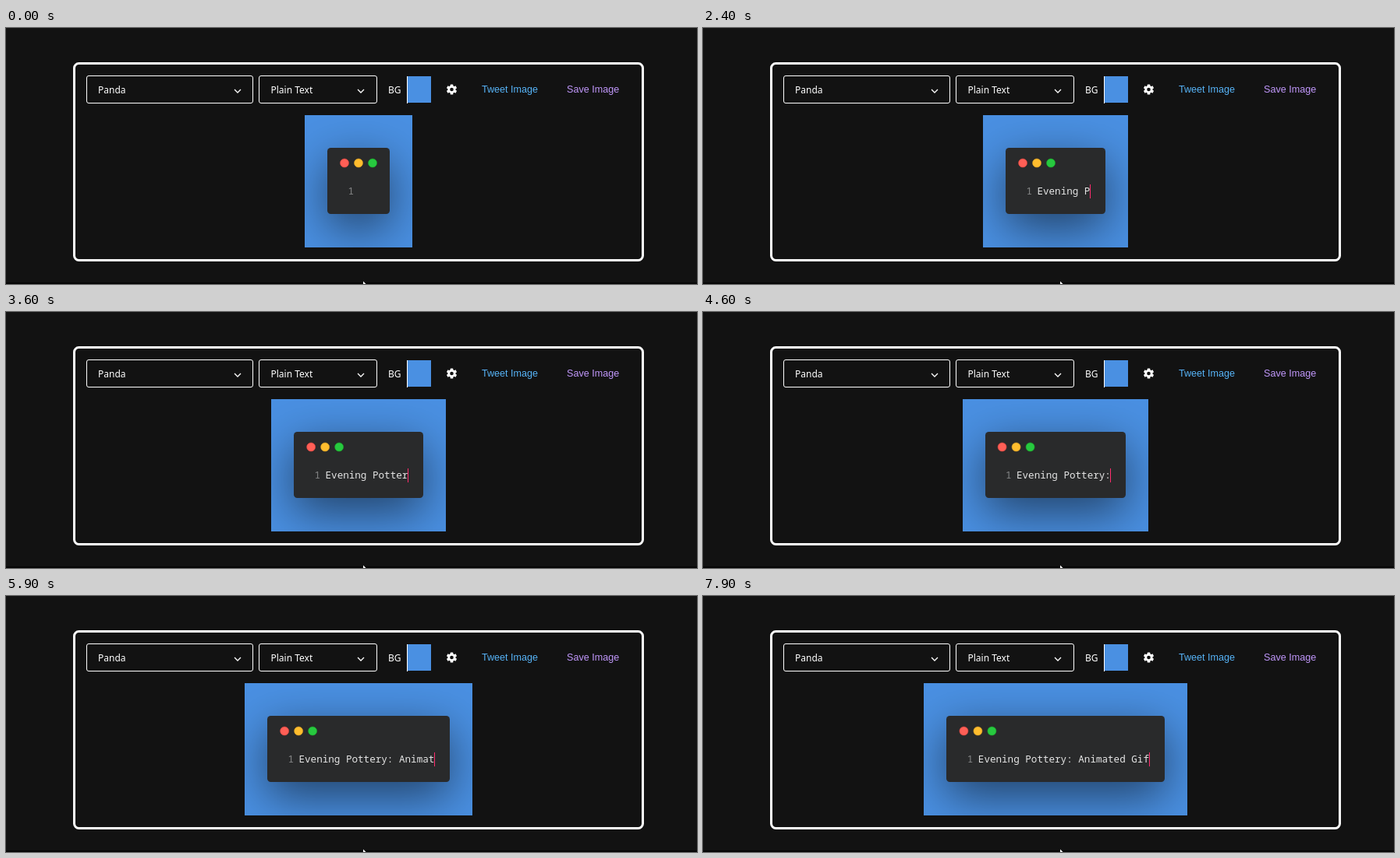
Write an HTML page that moves like this. It is 886 px wide and 329 px high and loops after 8 s.

```html
<!DOCTYPE html>
<html lang="en">
<head>
<meta charset="utf-8">
<title>Code image editor</title>
<style>
  html, body { margin: 0; width: 100%; height: 100%; overflow: hidden; background: #121212; }
  svg, #shot, #pane { position: absolute; }
  svg { left: 0; top: 0; }
  #shot { top: 112px; height: 170px; background: #4a90e2; overflow: hidden; }
  #pane {
    left: 29px; right: 29px; top: 42px; height: 85px; border-radius: 4.5px;
    background: #292a2b; box-shadow: 0 18px 61px rgba(0, 0, 0, .55);
  }
  .ui { font: 12px "Noto Sans", "Open Sans", sans-serif; fill: #fff; }
  .link { font: 12.6px "Liberation Sans", Arial, sans-serif; }
  .code { font: 12.6px "Noto Sans Mono", "DejaVu Sans Mono", monospace; white-space: pre; }
  .line { fill: none; stroke: #fff; }
</style>
</head>
<body>
<div id="shot"><div id="pane"></div></div>
<svg width="886" height="329" viewBox="0 0 886 329">
  <defs>
    <path id="chevron" class="line" d="M-4 -2 L0 2 L4 -2" stroke-width="1.3"/>
    <rect id="tooth" x="-1.8" y="-6.6" width="3.6" height="3" rx=".5"/>
  </defs>
  <rect class="line" x="87.5" y="45.5" width="729" height="253" rx="6" stroke-width="3"/>
  <rect class="line" x="103.5" y="61.5" width="213" height="35" rx="2.5"/>
  <rect class="line" x="324.5" y="61.5" width="151" height="35" rx="2.5"/>
  <use href="#chevron" x="297" y="81"/>
  <use href="#chevron" x="455" y="81"/>
  <g class="ui">
    <text x="118" y="84">Panda</text>
    <text x="339.5" y="84">Plain Text</text>
    <text x="490" y="84">BG</text>
  </g>
  <rect x="514" y="62" width="1" height="35" fill="#fff"/>
  <rect x="515" y="62" width="30" height="34" fill="#4a90e2"/>
  <g id="gear" transform="translate(571.5 79)" fill="#fff">
    <circle class="line" r="3.7" stroke-width="2.8"/>
  </g>
  <text class="link" x="610" y="83" fill="#57b5f9">Tweet Image</text>
  <text class="link" x="719" y="83" fill="#c198fb">Save Image</text>
  <rect y="327" width="886" height="2" fill="#050505"/>
  <path d="M458 325.5 L461.5 329 H458 Z" fill="#fff"/>
  <g id="content">
    <g stroke-width=".6">
      <circle cx="51" cy="173.5" r="5.5" fill="#ff5f56" stroke="#e0443e"/>
      <circle cx="69" cy="173.5" r="5.5" fill="#ffbd2e" stroke="#dea123"/>
      <circle cx="87" cy="173.5" r="5.5" fill="#27c93f" stroke="#1aab29"/>
    </g>
    <text class="code" x="55.4" y="214" fill="#858687">1</text>
    <text class="code" x="69.4" y="214" fill="#e6e6e6" id="typed"></text>
  </g>
  <rect id="caret" y="201" width="1" height="18"/>
</svg>
<script>
  const LOOP = 8000, CENTER = 452, CHAR = 7.56, TEXT_X = 69.4;
  const message = "Evening Pottery: Animated Gif";
  // Time at which each character is typed
  const keys = [
    500, 800, 1000, 1300, 1500, 1600, 1800, 2000, 2400, 2900,
    3100, 3200, 3400, 3500, 3700, 4600, 4800, 5000, 5300, 5400,
    5600, 5800, 5900, 6100, 6200, 6600, 7500, 7700, 7900
  ];
  const hidden = [[0, 200], [4200, 4600], [6600, 7500]];
  const faded = [1600, 1800];
  const within = (t, [from, to]) => t >= from && t < to;
  const $ = id => document.getElementById(id);
  const shot = $("shot"), content = $("content"), typed = $("typed"), caret = $("caret");

  for (let a = 0; a < 360; a += 60)
    $("gear").insertAdjacentHTML("beforeend", `<use href="#tooth" transform="rotate(${a})"/>`);

  function draw(t) {
    const count = keys.filter(k => k <= t).length;
    const half = Math.max(138, 117.9 + CHAR * count) / 2;
    const left = CENTER - half, edge = Math.round(left);
    shot.style.left = edge + "px";
    shot.style.width = 2 * (CENTER - edge) + "px";
    content.setAttribute("transform", `translate(${left} 0)`);
    typed.textContent = message.slice(0, count);
    caret.setAttribute("x", Math.floor(left + TEXT_X + CHAR * count));
    caret.setAttribute("fill", within(t, faded) ? "#6f7478" : "#ff2c6d");
    caret.setAttribute("visibility", hidden.some(span => within(t, span)) ? "hidden" : "visible");
  }

  const start = performance.now();
  function tick() {
    draw((performance.now() - start) % LOOP);
    requestAnimationFrame(tick);
  }
  tick();
</script>
</body>
</html>
```
